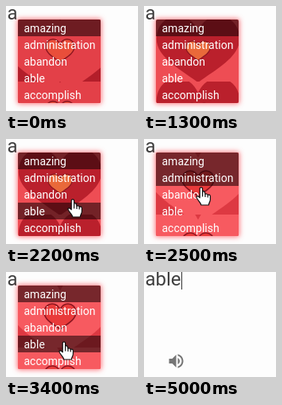
Animation, 166 px wide and 132 px high, one loop 5.2 s. Source, as an HTML page:

```html
<!DOCTYPE html>
<html lang="en">
<head>
<meta charset="utf-8">
<title>Word suggestions</title>
<style>
  html, body { margin: 0; width: 100%; height: 100%; overflow: hidden; background: #fdfdfd; }
  body { position: relative; font-family: Roboto, Arial, sans-serif; }
  svg { position: absolute; left: 0; top: 0; width: 166px; height: 132px; overflow: hidden; }
  #typed { position: absolute; left: 1.5px; top: -5px; font-size: 24px; line-height: 28px; color: #404040; }
  #caret { position: absolute; left: 47px; top: 0; width: 1px; height: 22px; background: #333; }
  #menu { position: absolute; left: 15px; top: 17px; width: 104px; height: 105px; overflow: hidden;
    border-radius: 2px; box-shadow: 0 0 6px 1px rgba(255, 60, 70, .7); }
  #menu svg { left: -15px; top: -17px; }
  .row { position: relative; height: 21px; padding-left: 7.5px; font-size: 14px; line-height: 22px; color: #fff; }
  .on { background: rgba(20, 0, 5, .56); }
  .cursor { fill: #fff; stroke: #111; stroke-width: 1.2; stroke-linejoin: round; }
</style>
</head>
<body>
<div id="typed">a</div>
<div id="caret"></div>
<svg id="speaker" viewBox="0 0 166 132">
  <path transform="translate(28.5 100)" fill="#757575" d="M3 9v6h4l5 5V4L7 9H3zm13.5 3c0-1.77-1.02-3.29-2.5-4.03v8.05c1.48-.73 2.5-2.25 2.5-4.02zM14 3.23v2.06c2.89.86 5 3.54 5 6.71s-2.11 5.85-5 6.71v2.06c4.01-.91 7-4.49 7-8.77s-2.99-7.86-7-8.77z"/>
</svg>

<div id="menu">
  <svg viewBox="0 0 166 132">
    <defs>
      <path id="shape" d="M0 15C-8 9-20 3-20-6C-20-13-15-17-10-17C-5-17-2-14 0-10C2-14 5-17 10-17C15-17 20-13 20-6C20 3 8 9 0 15Z"/>
      <clipPath id="tile"><rect x="-60" y="-40" width="120" height="78"/></clipPath>
      <g id="beat" clip-path="url(#tile)">
        <use id="wave" href="#shape"/>
        <use id="heart" href="#shape" stroke="#8c1620" stroke-width="1.6"/>
      </g>
    </defs>
    <use href="#beat" x="68" y="57"/>
    <use href="#beat" x="68" y="135"/>
  </svg>
  <div class="row">amazing</div>
  <div class="row">administration</div>
  <div class="row">abandon</div>
  <div class="row">able</div>
  <div class="row">accomplish</div>
</div>

<svg viewBox="0 0 166 132">
  <g id="hand" class="cursor">
    <path d="M-1.8 1.5C-1.8-.6 1.6-.6 1.6 1.5V8C2 0 5 7 5 8.6C5.6 7.4 8.2 7.8 8.2 9.6C9 8.6 11.4 9 11.4 11V15C11.4 18 9.5 19 9.3 22H-.2C-.6 19-5.8 14.6-6 12.2C-6 10.4-3.8 10.4-1.8 12.8Z"/>
    <path d="M1.6 8V11.5M5 8.6V12M8.2 9.6V12.4" fill="none"/>
  </g>
  <path id="arrow" class="cursor" d="M0 0V16L3.7 12.6L6.3 18.6L9 17.4L6.4 11.6H11.6Z"/>
</svg>

<script>
const LOOP = 5200, STEP = 100, PICK = 3700, BEAT = 900, BLINK = 500;
const TOP = 17, ROW = 21;
const $ = id => document.getElementById(id);
const rows = [...document.querySelectorAll('.row')];

// Pointer moves: [time, x, y]
const handPath = [[1600, 104, 136], [1900, 102, 114], [2400, 72, 50], [2500, 72, 61], [3000, 73, 88]];
const arrowPath = [[4500, 69, 89], [4900, 71, 136]];

function at(path, t) {
  let [, x, y] = path[0];
  for (let i = 1; i < path.length; i++) {
    const [t0, x0, y0] = path[i - 1], [t1, x1, y1] = path[i];
    if (t <= t0) break;
    const p = Math.min(1, (t - t0) / (t1 - t0));
    x = x0 + (x1 - x0) * p;
    y = y0 + (y1 - y0) * p;
  }
  return [Math.round(x), Math.round(y)];
}

const wave = turn => Math.cos(2 * Math.PI * turn);
const show = (id, on) => { $(id).style.visibility = on ? 'visible' : 'hidden'; };
const place = (id, path, t) => $(id).setAttribute('transform', `translate(${at(path, t)})`);

// Red that swings between dark and pink as a wave ages.
function red(age) {
  const l = .55 + .43 * wave(age - .79);
  return `rgb(${[165 + 85 * l, 28 + 67 * l * l, 40 + 60 * l * l].map(Math.round)})`;
}

function paint(id, fill, scale) {
  $(id).setAttribute('fill', fill);
  $(id).setAttribute('transform', `scale(${scale})`);
}

function drawBeat(phase) {
  const age = (phase + .97) % 1;
  const swell = wave(phase - .8);
  $('menu').style.backgroundColor = red(age + .25);
  paint('wave', red(age), 1.7 + 2.2 * age);
  paint('heart', `hsl(${10 - 10 * swell}, 80%, 57%)`, .85 + .15 * swell);
}

function draw(t) {
  const open = t < PICK;
  show('menu', open);
  show('hand', open);
  show('speaker', !open);
  show('arrow', !open);
  show('caret', !open && Math.floor((t - PICK) / BLINK) % 2 === 0);
  $('typed').textContent = open ? 'a' : 'able';
  place('hand', handPath, t);
  place('arrow', arrowPath, t);
  drawBeat(t % BEAT / BEAT);
  // The hover trails the pointer by one step.
  const over = Math.floor((at(handPath, t - STEP)[1] - TOP) / ROW);
  rows.forEach((row, i) => row.classList.toggle('on', i === 0 || i === over));
}

const start = performance.now();
function tick(now) {
  const t = Math.max(0, now - start) % LOOP;
  draw(Math.floor(t / STEP) * STEP);
  requestAnimationFrame(tick);
}
draw(0);
requestAnimationFrame(tick);
</script>
</body>
</html>
```
